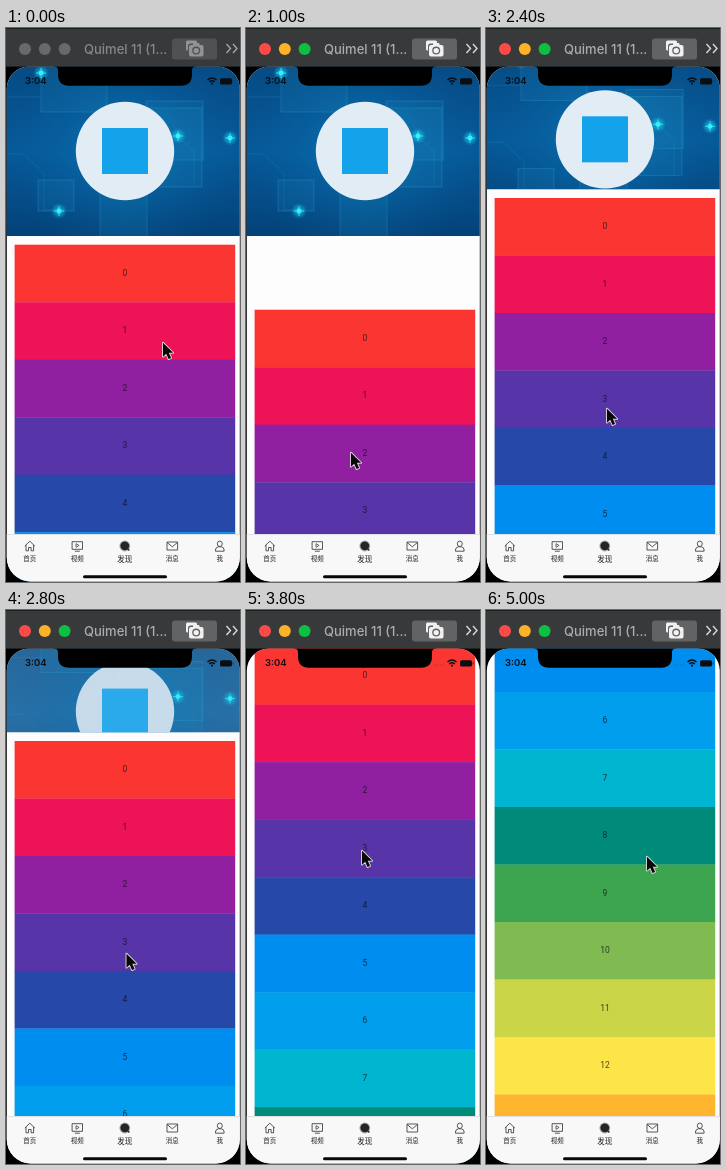
Recreate the animation shown at these times as an HTML page with a canvas. Size 234 by 554 pixels, loop 5.2 s.

```html
<!DOCTYPE html>
<html lang="zh">
<head>
<meta charset="utf-8">
<title>Collapsing header list</title>
<style>
html, body { margin: 0; width: 100%; height: 100%; overflow: hidden; background: #000; }
canvas { display: block; width: 234px; height: 554px; }
</style>
</head>
<body>
<canvas></canvas>
<script>
const W = 234, H = 554, LOOP = 5200, STEP = 200;
const SCREEN_TOP = 38.6, HEADER_BOTTOM = 208, LIST_TOP = 216.7, ROW = 57.5, TABS_TOP = 506;
const COLLAPSE = 113, FADE_START = 0.72;
const COLORS = ['#fb3632', '#ee1357', '#9020a0', '#5734a8', '#2648a8', '#008df0', '#009eec',
  '#00b5cf', '#008a7a', '#3da44f', '#80bb52', '#cad647', '#fde447', '#ffb52d'];
const CJK = '"Noto Sans CJK SC", "Noto Sans CJK", sans-serif';

// time, scroll (negative = pulled down), pointer x, pointer y
const KEYS = [
  [0, 0, 157, 314], [200, 0, 145, 318], [1000, -65, 105, 424], [1200, -65, 105, 426],
  [1400, -40, 109, 427], [1600, -8, 114, 427], [1800, 0, 118, 427], [2400, 46.7, 121, 380],
  [3200, 124.7, 120, 306], [3800, 179.6, 116, 240], [4400, 256.7, 144, 241], [5000, 479.7, 161, 246]
];

const canvas = document.querySelector('canvas');
const ratio = window.devicePixelRatio || 1;
canvas.width = W * ratio;
canvas.height = H * ratio;
const c = canvas.getContext('2d');

function stateAt(time) {
  const next = KEYS.findIndex(k => k[0] > time);
  if (next < 0) return KEYS[KEYS.length - 1];
  const a = KEYS[next - 1], b = KEYS[next];
  const p = (time - a[0]) / (b[0] - a[0]);
  return a.map((v, i) => v + (b[i] - v) * p);
}

function rect(x, y, w, h, fill) {
  c.fillStyle = fill;
  c.fillRect(x, y, w, h);
}

function round(x, y, w, h, r, fill) {
  c.beginPath();
  c.roundRect(x, y, w, h, r);
  c.fillStyle = fill;
  c.fill();
}

function disc(x, y, r, fill) {
  c.beginPath();
  c.arc(x, y, r, 0, Math.PI * 2);
  c.fillStyle = fill;
  c.fill();
}

function line(path, color, width = 1) {
  c.strokeStyle = color;
  c.lineWidth = width;
  c.stroke(new Path2D(path));
}

function text(value, x, y, font, fill, align = 'center') {
  c.font = font;
  c.fillStyle = fill;
  c.textAlign = align;
  c.textBaseline = 'middle';
  c.fillText(value, x, y);
}

function at(x, y, draw) {
  c.save();
  c.translate(x, y);
  draw();
  c.restore();
}

function drawCamera(ink, hole) {
  round(180, 12.5, 11, 10, 1.5, ink);
  round(182, 15.5, 16, 13.5, 2.5, hole);
  round(183, 17, 14.5, 11.5, 2, ink);
  round(187, 15, 6.5, 4, 1, ink);
  disc(190.2, 22.6, 4, hole);
  disc(190.2, 22.6, 2.7, ink);
}

function drawTitleBar(active) {
  rect(0, 0, W, SCREEN_TOP, '#38393b');
  rect(0, 0, W, 1, '#17201f');
  const lights = active ? ['#fc4a48', '#fdb228', '#0cc142'] : ['#68696b', '#68696b', '#68696b'];
  lights.forEach((color, i) => disc(19 + i * 19.8, 21, 6, color));
  text('Quimel 11 (1...', 78, 22, '500 13px Inter, sans-serif', active ? '#acadaf' : '#87888a', 'left');
  const button = active ? '#626365' : '#505153';
  round(166, 10.5, 45, 21, 3, button);
  drawCamera(active ? '#f2f2f2' : '#929395', button);
  line('M220.5 16l4 4.5-4 4.5M227 16l4 4.5-4 4.5', active ? '#dadada' : '#a5a5a7', 1.4);
}

function drawPicture() {
  const base = c.createLinearGradient(0, 38, 0, 208);
  base.addColorStop(0, '#064b84');
  base.addColorStop(0.5, '#065a99');
  base.addColorStop(1, '#044278');
  rect(0, 38, W, 170, base);
  const glow = c.createRadialGradient(119, 120, 20, 119, 120, 115);
  glow.addColorStop(0, 'rgba(10,125,190,.5)');
  glow.addColorStop(1, 'rgba(10,100,170,0)');
  rect(0, 38, W, 170, glow);
  [[35, 30, 66, 54], [94, 162, 47, 60], [32, 152, 36, 31], [140, 73, 57, 59], [112, 80, 84, 79]]
    .forEach(([x, y, w, h]) => {
      rect(x, y, w, h, 'rgba(30,140,190,.14)');
      c.strokeStyle = 'rgba(50,165,210,.4)';
      c.lineWidth = 0.7;
      c.strokeRect(x, y, w, h);
    });
  line('M0 126h18l20 20v36h15M172 108l16 16v35M0 69h35', 'rgba(40,155,205,.3)', 0.7);
  [[35, 45], [172, 108], [224, 110], [53, 183]].forEach(([x, y]) => {
    const halo = c.createRadialGradient(x, y, 0, x, y, 8);
    halo.addColorStop(0, 'rgba(20,225,250,.85)');
    halo.addColorStop(1, 'rgba(20,200,240,0)');
    disc(x, y, 8, halo);
    line(`M${x - 5} ${y}h10M${x} ${y - 5}v10`, '#2be0f2', 1);
    disc(x, y, 2.4, '#3aeef8');
  });
  disc(119, 123, 49.2, '#e2ecf5');
  rect(96, 100, 46, 46, '#12a3ea');
}

function drawHeader(scroll) {
  const offset = Math.max(0, scroll);
  const progress = Math.min(1, offset / COLLAPSE);
  const fade = Math.max(0, (progress - FADE_START) / (1 - FADE_START));
  if (fade === 1) return;
  c.save();
  c.beginPath();
  c.rect(0, SCREEN_TOP, W, HEADER_BOTTOM - offset - SCREEN_TOP);
  c.clip();
  c.globalAlpha = 1 - fade;
  c.translate(0, -COLLAPSE / 4 * progress);
  drawPicture();
  c.restore();
}

function drawList(scroll) {
  const top = LIST_TOP - scroll;
  COLORS.forEach((color, i) => {
    const y = top + i * ROW;
    if (y > TABS_TOP || y + ROW < SCREEN_TOP) return;
    rect(8.6, y, 220.6, ROW + 0.3, color);
    text(i, 119, y + ROW / 2, '8.5px Roboto, sans-serif', 'rgba(15,15,25,.75)');
  });
}

function drawStatusBar() {
  c.fillStyle = '#000';
  c.fill(new Path2D('M48 38h142v.6q-4 0-4 4v4q0 11.2-11 11.2h-112q-11 0-11-11.2v-4q0-4-4-4z'));
  text('3:04', 19, 53.5, '600 9.5px Inter, sans-serif', '#0b0d10', 'left');
  for (let i = 0; i < 4; i++) disc(189 + i * 2.7, 55, 0.75, 'rgba(70,70,75,.45)');
  line('M201.5 52q4.5-4 9 0M203.2 54q2.8-2.4 5.6 0', '#0b0d10', 1.5);
  disc(206, 55.6, 1.1, '#0b0d10');
  round(214, 50.2, 12, 6.3, 1.6, '#0b0d10');
  rect(226.6, 52, 1, 2.6, '#333');
}

const tabs = [
  ['首页', () => line('M-5 0L0-4.8 5 0M-3.8-1v5.8h2.5V1.5h2.6v3.3h2.5V-1', '#444', 0.9)],
  ['视频', () => {
    line('M-5.2-4.3h10.4v7.6h-10.4zM-2.5 5.2h5', '#444', 0.9);
    line('M-1.3-2.3L1.8-.5-1.3 1.3z', '#444', 0.8);
  }],
  ['发现', () => {
    disc(0, 0, 5.4, '#a8a8a8');
    disc(0, -0.2, 4.4, '#252525');
    line('M2.8 2.8l1.8 1.8', '#252525', 1.4);
  }],
  ['消息', () => line('M-5.3-4h10.6v8h-10.6zM-5.3-3.6L0 .8l5.3-4.4', '#444', 0.9)],
  ['我', () => line('M-2.5-2.2a2.5 2.7 0 1 1 5 0a2.5 2.7 0 1 1-5 0M-4.3 5.2v-1.2q0-2.8 2.8-3.2h3q2.8.4 2.8 3.2v1.2z', '#444', 0.9)]
];

function drawTabs() {
  rect(0, TABS_TOP, W, H - TABS_TOP, '#f8f8f8');
  rect(0, TABS_TOP, W, 0.6, '#d2d2d5');
  tabs.forEach(([label, icon], i) => {
    const x = 23.8 + i * 47.5;
    at(x, 518, icon);
    text(label, x, 531, `${i === 2 ? 7.5 : 6.5}px ${CJK}`, '#222');
  });
  round(77, 547.2, 84, 3, 1.5, '#080808');
}

function drawPointer(x, y) {
  at(x, y + 0.7, () => {
    c.scale(0.92, 0.92);
    const arrow = new Path2D('M0 0V15.2L3.5 12 6 17.8 8.8 16.6 6.3 11H11z');
    c.lineJoin = 'round';
    c.strokeStyle = '#d8d8d8';
    c.lineWidth = 2;
    c.stroke(arrow);
    c.fillStyle = '#080808';
    c.fill(arrow);
  });
}

function draw(time) {
  const [, scroll, x, y] = stateAt(time);
  c.setTransform(ratio, 0, 0, ratio, 0, 0);
  rect(0, 0, W, H, '#000');
  drawTitleBar(time >= STEP);
  c.save();
  c.beginPath();
  c.roundRect(0.8, SCREEN_TOP, 233, 515, [22, 22, 24, 24]);
  c.clip();
  rect(0, SCREEN_TOP, W, H, '#fdfdfd');
  drawList(scroll);
  drawHeader(scroll);
  drawStatusBar();
  drawTabs();
  c.restore();
  drawPointer(x, y);
}

function frame() {
  const time = performance.now() % LOOP;
  draw(Math.floor(time / STEP) * STEP);
  requestAnimationFrame(frame);
}
frame();
</script>
</body>
</html>
```
